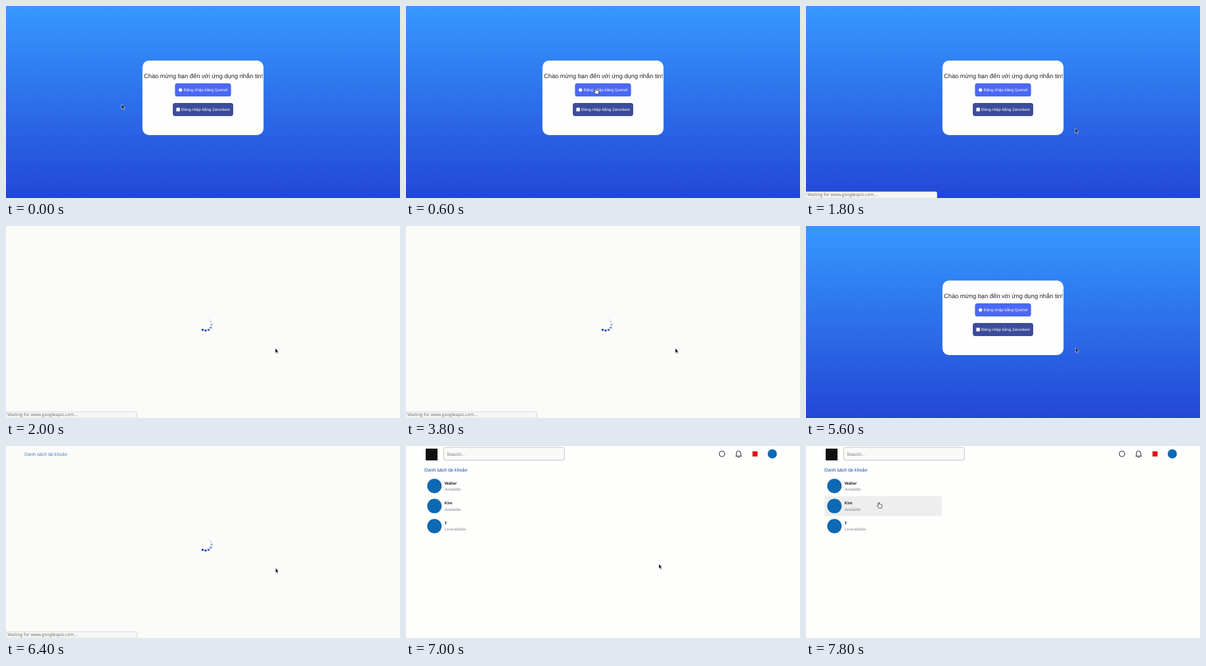
Recreate the animation shown at these times as an HTML page. Size 600x293 px, loop 8 s.

```html
<!DOCTYPE html>
<html lang="vi">
<head>
<meta charset="utf-8">
<title>Ứng dụng nhắn tin</title>
<style>
  html, body { margin: 0; width: 100%; height: 100%; overflow: hidden; background: #fbfbf9; }
  svg { display: block; width: 100vw; height: 100vh; }
  text { font-family: "Liberation Sans", Arial, sans-serif; text-rendering: geometricPrecision; white-space: pre; }
  .title { font-size: 9.31px; fill: #222; }
  .btn { font-size: 6.15px; fill: #fff; }
  .link { font-size: 7.18px; }
  .name { font-size: 6.2px; font-weight: bold; fill: #222; }
  .state { font-size: 6.16px; fill: #888; }
  .search { font-size: 7px; fill: #777; }
  .wait { font: 6.68px "Open Sans", "Noto Sans", sans-serif; fill: #666; }
</style>
</head>
<body>
<svg viewBox="0 0 600 293" preserveAspectRatio="none">
  <defs>
    <linearGradient id="sky" x1="0" y1="0" x2="0" y2="1">
      <stop offset="0" stop-color="#3698ff"/>
      <stop offset="1" stop-color="#2347d6"/>
    </linearGradient>
  </defs>

  <g id="login">
    <rect width="600" height="293" fill="url(#sky)"/>
    <rect x="207.8" y="83.2" width="184.4" height="113.8" rx="10" fill="#fefefe"/>
    <text class="title" x="210" y="109.7">Chào mừng bạn đến với ứng dụng nhắn tin!</text>
    <rect x="257.3" y="118" width="85.4" height="20" rx="3.6" fill="#4b68f6"/>
    <circle cx="265.6" cy="128.1" r="2.7" fill="#fff"/>
    <text class="btn" x="270.5" y="130.3">Đăng nhập bằng Quonel</text>
    <rect x="254" y="148" width="92" height="19.9" rx="3.6" fill="#3d4b9c"/>
    <rect x="259.4" y="155.3" width="5.4" height="5.4" fill="#fff"/>
    <text class="btn" x="266.9" y="160.2">Đăng nhập bằng Zarvokem</text>
  </g>

  <g id="loading">
    <rect width="600" height="293" fill="#fbfbf9"/>
    <text id="heading" class="link" x="28" y="14.5" fill="#4280c2">Danh sách tài khoản</text>
    <g id="dots" fill="#1d3fa8"></g>
  </g>

  <g id="home">
    <rect width="600" height="293" fill="#fefefd"/>
    <rect x="30" y="4" width="18" height="18" fill="#111"/>
    <rect x="57.3" y="2" width="184" height="19.6" rx="2.6" fill="#f9faf8" stroke="#b4b4b4" stroke-width=".8"/>
    <text class="search" x="62" y="14.5">Search...</text>
    <g fill="none" stroke="#222" stroke-width="1">
      <circle cx="481.2" cy="12" r="4.1"/>
      <path d="M502 15.6H511M503.1 15.5V11.2a3.4 3.7 0 0 1 6.8 0V15.5M505.2 17.4H507.8"/>
    </g>
    <rect x="527.6" y="8.2" width="7.8" height="7.8" fill="#e2120e"/>
    <circle cx="557.8" cy="12" r="7" fill="#0d69b4"/>
    <text class="link" x="28" y="39.2" fill="#0b46a6">Danh sách tài khoản</text>
    <rect id="hover" x="28.2" y="76.6" width="178.7" height="30.5" fill="#edeeed"/>
    <g id="rows"></g>
  </g>

  <g id="status">
    <path d="M0 283.4H197.4q2 0 2 2V293H0Z" fill="#f6f6f5" stroke="#d2d2d2" stroke-width=".7"/>
    <text class="wait" x="2" y="290.4">Waiting for www.googleapis.com...</text>
  </g>

  <path id="arrow" d="M0 0V7.3L1.7 5.8L2.9 8.4L4.1 7.8L3 5.3H5.2Z" fill="#111" stroke="#fff" stroke-width=".7" stroke-opacity=".75"/>
  <path id="hand" d="M-.9 .9Q0 -.5 .8 .9V3.2Q1.6 2.6 2.3 3.4Q3.1 2.9 3.7 3.8Q4.6 3.5 4.8 4.6V6.3Q4.6 7.6 4 8.9H-.3Q-1 7.4 -2.7 5.6Q-2.5 4.3 -.9 5.4Z" fill="#fff" stroke="#222" stroke-width=".8" stroke-linejoin="round"/>
</svg>

<script>
const LOOP = 8000, TICK = 200;
const $ = id => document.getElementById(id);

// start, scene, spinner start (null: none), heading
const scenes = [
  [0, "login"],
  [2000, "loading", 2000],
  [3800, "loading", 3800],
  [5600, "login"],
  [6400, "loading", 6400, true],
  [7000, "home"]
];

// start, shape, tip x, tip y
const pointer = [
  [0, "arrow", 176, 150],
  [200, "arrow", 222, 144],
  [400, "hand", 271, 129],
  [600, "hand", 289, 125.4],
  [1400, "hand", 312, 133],
  [1600, "arrow", 378, 168],
  [1800, "arrow", 410, 186.5],
  [5600, "arrow", 410.4, 185.6],
  [6400, "arrow", 410.4, 186.2],
  [7000, "arrow", 385, 180],
  [7200, "arrow", 228, 148],
  [7400, "arrow", 121, 119.5],
  [7600, "hand", 114, 95],
  [7800, "hand", 111, 85.8]
];

const statusSpans = [[1800, 4800], [6400, 7000]];
const people = [["Walter", "Available"], ["Kim", "Available"], ["T", "Unavailable"]];

function add(parent, tag, attrs, text = "") {
  const el = document.createElementNS("http://www.w3.org/2000/svg", tag);
  for (const key in attrs) el.setAttribute(key, attrs[key]);
  el.textContent = text;
  return parent.appendChild(el);
}

people.forEach(([name, state], i) => {
  const y = 61 + i * 30.6;
  add($("rows"), "circle", { cx: 43.3, cy: y, r: 11, fill: "#0d69b4" });
  add($("rows"), "text", { class: "name", x: 58.8, y: y - 2.4 }, name);
  add($("rows"), "text", { class: "state", x: 58.8, y: y + 7.1 }, state);
});

const dots = Array.from({ length: 12 }, (_, i) => {
  const a = i * Math.PI / 6;
  return add($("dots"), "circle", {
    cx: 304 + 9.1 * Math.sin(a), cy: 150.5 - 9.1 * Math.cos(a), r: 1.75
  });
});

const at = (table, t) => table.filter(row => row[0] <= t).pop();
const show = (id, on) => $(id).setAttribute("display", on ? "inline" : "none");
const smooth = p => p * p * (3 - 2 * p);

// Each dot lights up at 40% of its 1.2 s cycle, then fades out.
function spin(ms) {
  dots.forEach((dot, i) => {
    const phase = (ms / 1200 + (12 - i) / 12) % 1;
    dot.setAttribute("opacity", phase < 0.4 ? 0 : 1 - smooth((phase - 0.4) / 0.6));
  });
}

function draw(now) {
  const t = Math.floor(now % LOOP / TICK) * TICK;
  const [, scene, spinStart, heading] = at(scenes, t);
  for (const id of ["login", "loading", "home"]) show(id, id === scene);
  show("heading", heading);
  show("hover", t >= 7600);
  show("status", statusSpans.some(([from, to]) => t >= from && t < to));

  if (scene === "loading") {
    // The page stalls between 2400 and 3800.
    const spinTime = spinStart === 2000 ? Math.min(t, 2400) : t;
    spin(spinTime - spinStart);
  }

  const [, shape, x, y] = at(pointer, t);
  for (const id of ["arrow", "hand"]) show(id, id === shape);
  $(shape).setAttribute("transform", `translate(${x} ${y})`);
}

let start;
function loop(now) {
  start ??= now;
  draw(Math.max(0, now - start));
  requestAnimationFrame(loop);
}
draw(0);
requestAnimationFrame(loop);
</script>
</body>
</html>
```
